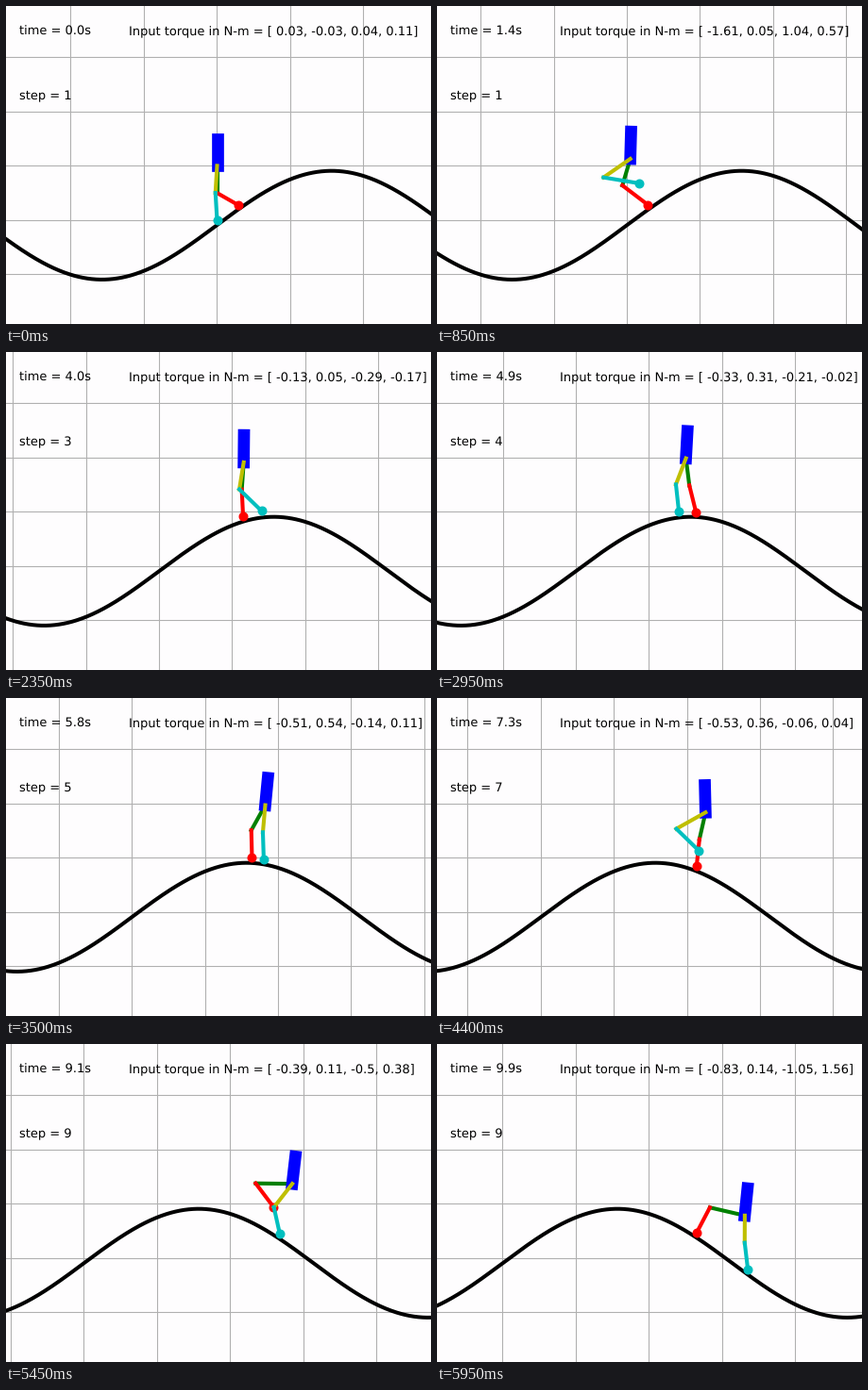
A matplotlib script for the animation above (6000 ms loop, 450x337 px).

```python
import numpy as np
import matplotlib.pyplot as plt
from matplotlib.animation import FuncAnimation

W, H, DPI = 450, 337, 100
FRAMES, INTERVAL = 120, 50
PT = 72 / DPI                # points per pixel
UX, UY = 77.4, 57.6          # pixels per grid cell
X0, Y0 = 223.2, 227.1        # world origin on the stage
STRETCH = UX / UY
LINK = UY / 2
SPEED = 0.2 * UX             # camera pixels per simulated second

# Footholds, taken by the rear and front foot in turn, and swing times
HOLDS = [223.5, 245.5, 267, 312.3, 332.3, 350.5, 363, 388.3, 398,
         408.7, 430.7, 428.6, 482.9]
SWINGS = np.cumsum([1.0, 1.2] + [0.9] * 6 + [0.35, 0.9, 0.35, 0.7])

# Key poses: hip position, torso lean and joint torques
KEYS = [0, 17, 47, 70, 88, 100, 119]
HIP = [223.5, 226.8, 312.9, 364.6, 397.8, 411.6, 479.6]
LEAN = [0, 0.8, 0.3, 2.75, -0.7, 3.7, 2.9]
TORQUES = [(0.03, -1.61, -0.13, -0.51, -0.53, -0.001, -0.83),
           (-0.03, 0.05, 0.05, 0.54, 0.36, 0.08, 0.14),
           (0.04, 1.04, -0.29, -0.14, -0.06, 0.0, -1.05),
           (0.11, 0.57, -0.17, 0.11, 0.04, -0.69, 1.56)]


def clock(i):
    return np.interp(i, [0, 47, 70, 119], [0, 3.955, 5.82, 9.93])


def ground(x):
    return Y0 - UY * np.sin((x - X0) / UX)


def foot(side, t):
    """Foot position; swings ease forward and rise more on steep ground."""
    x, arc = HOLDS[side], 0
    for k in range(side, len(HOLDS) - 2, 2):
        u = np.clip((t - SWINGS[k]) / (SWINGS[k + 1] - SWINGS[k]), 0, 1)
        x += (HOLDS[k + 2] - HOLDS[k]) * u * u * (3 - 2 * u)
        arc += np.sin(np.pi * u)
    slope = abs(np.cos((x - X0) / UX))
    return x, ground(x) - arc * (8 + 25 * slope)


def hip_above(x, feet):
    """Stand as tall as the legs allow."""
    y = ground(x) - 62.4
    for fx, fy in feet:
        dx = (fx - x) / STRETCH
        y = max(y, fy - np.sqrt((1.998 * LINK) ** 2 - dx * dx))
    return x, y


def knee(hip, foot):
    """Two-link joint that bends backwards."""
    dx, dy = (foot[0] - hip[0]) / STRETCH, foot[1] - hip[1]
    d = np.hypot(dx, dy)
    h = np.sqrt(max(LINK ** 2 - d * d / 4, 0))
    return hip[0] + STRETCH * (dx / 2 - dy / d * h), hip[1] + dy / 2 + dx / d * h


plt.rcParams["text.hinting"] = "none"
fig = plt.figure(figsize=(W / DPI, H / DPI), dpi=DPI, facecolor="#fefdfe")
ax = fig.add_axes([0, 0, 1, 1])
ax.set(xlim=(0, W), ylim=(H, 0))
ax.axis("off")

GRID = dict(color="#b0b0b0", lw=1.1 * PT, zorder=1)
CELLS = range(-3, 6)
for n in range(-1, 4):
    ax.axhline(Y0 - 0.3 + (n - 2) * UY, **GRID)
verticals = [ax.axvline(0, **GRID) for _ in CELLS]

xs = np.linspace(-5, W + 5, 400)
hill, = ax.plot(xs, xs, "k", lw=4 * PT, zorder=2)


def limb(color, z, width=4.1):
    return ax.plot([], [], color=color, lw=width * PT, zorder=z,
                   solid_capstyle="projecting")[0]


def leg(thigh, shin, z):
    sole, = ax.plot([], [], "o", color=shin, ms=8.6 * PT, zorder=z + 1)
    return limb(thigh, z), limb(shin, z + 1), sole


def label(x, y):
    return ax.text(x, y, "", fontsize=12.97 * PT, family="DejaVu Sans",
                   va="baseline", zorder=9)


front, torso, rear = leg("g", "r", 3), limb("b", 5, 12.7), leg("y", "c", 6)
time_text, torque_text, step_text = label(14, 31), label(130.5, 31), label(14, 99)


def join(line, *points):
    line.set_data(*zip(*points))


def pose_leg(parts, hip, joint, end):
    thigh, shin, sole = parts
    join(thigh, hip, joint)
    join(shin, joint, end)
    join(sole, end)


def draw(i):
    t = clock(i)
    cam = SPEED * t

    for n, line in zip(CELLS, verticals):
        x = X0 + n * UX - cam % UX
        line.set_xdata([x, x])
    hill.set_ydata(ground(xs + cam) + 5.2)

    feet = [foot(side, t) for side in (0, 1)]
    hip = hip_above(np.interp(i, KEYS, HIP), feet)
    hip, back, ahead = [(x - cam, y) for x, y in (hip, *feet)]

    # The front knee starts straight below the hip
    w = max(0, 1 - i / 5)
    kx, ky = knee(hip, ahead)
    bent = kx + w * (hip[0] - kx), ky + w * (hip[1] + LINK - ky)
    pose_leg(front, hip, bent, ahead)
    pose_leg(rear, hip, knee(hip, back), back)
    join(torso, hip, (hip[0] + np.interp(i, KEYS, LEAN), hip[1] - LINK))

    values = [round(float(np.interp(i, KEYS, v)), 2) for v in TORQUES]
    time_text.set_text(f"time = {t:.1f}s")
    torque_text.set_text("Input torque in N-m = [ " + ", ".join(map(str, values)) + "]")
    step_text.set_text(f"step = {1 + int(max(0, t - 1.3) / 0.96)}")
    return []


anim = FuncAnimation(fig, draw, frames=FRAMES, interval=INTERVAL,
                     repeat=True, repeat_delay=0, blit=False)
plt.show()
```
